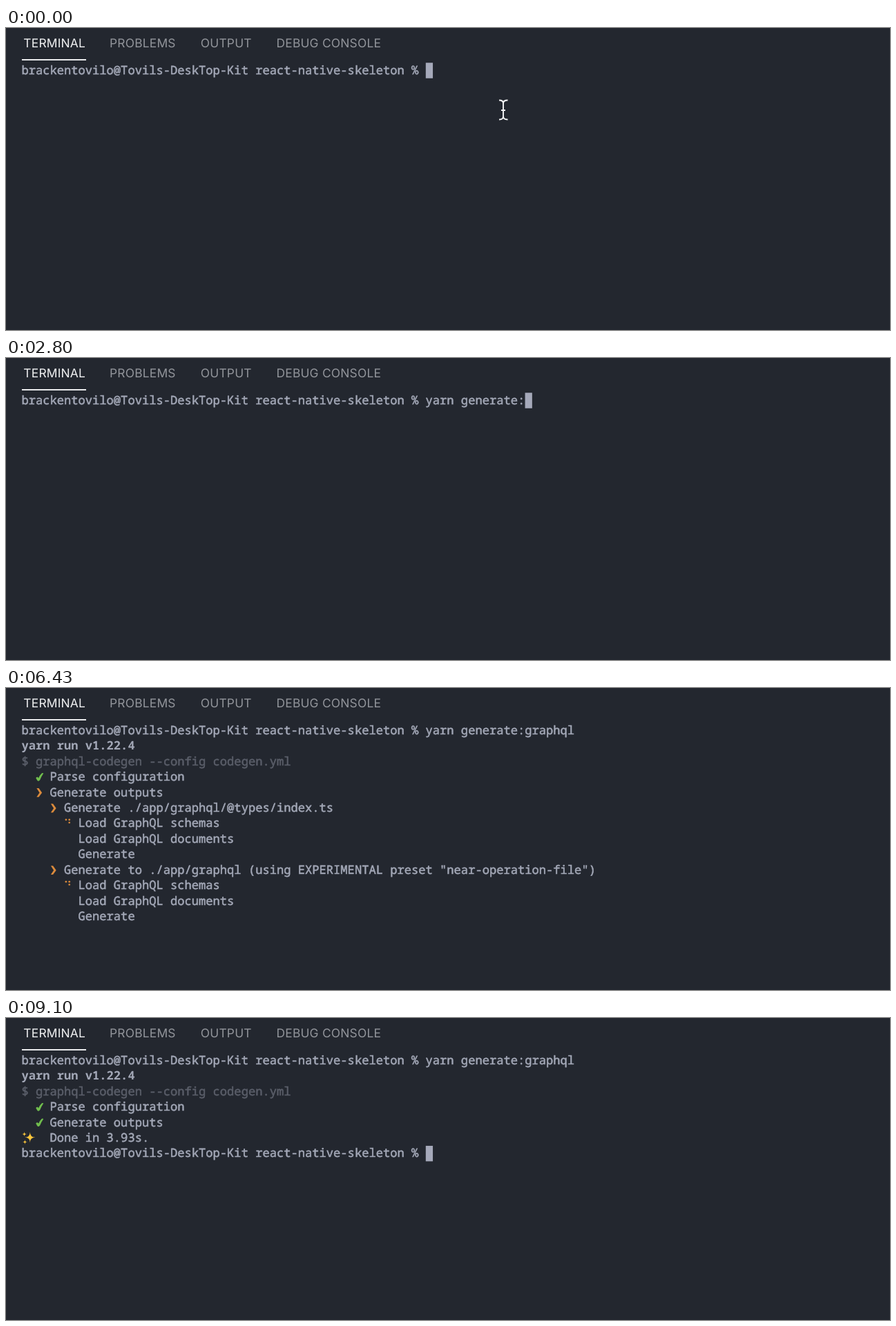
An HTML page with a canvas that plays this animation: 1280 by 437 pixels, repeating every 9810 ms.

```html
<!DOCTYPE html>
<html lang="en">
<head>
<meta charset="utf-8">
<title>Terminal</title>
<style>
  html, body { margin: 0; width: 100%; height: 100%; overflow: hidden; background: #23272f; }
  body { position: relative; text-rendering: geometricPrecision; }
  canvas { position: absolute; left: 0; top: 0; }
  .tab {
    position: absolute; top: 11.5px; white-space: pre; color: #92959b;
    font: 17.4px/22px Inter, "Liberation Sans", sans-serif; letter-spacing: .2px;
  }
  .tab.on { color: #f0f1f2; }
  .underline { position: absolute; left: 23px; top: 45px; width: 93px; height: 2px; background: #e9eaec; }
  .row {
    position: absolute; white-space: pre; color: #a3a8b7;
    font: 500 17.117px/22.44px "Noto Sans Mono", "DejaVu Sans Mono", monospace;
    font-variant-ligatures: none; -webkit-text-stroke: .55px;
  }
  .row.bold { font-weight: 700; -webkit-text-stroke: 0; }
  .row.dim { color: #5a5e69; }
</style>
</head>
<body>
<div class="tab on" style="left:25.3px">TERMINAL</div>
<div class="tab" style="left:150px">PROBLEMS</div>
<div class="tab" style="left:281.8px">OUTPUT</div>
<div class="tab" style="left:391.5px">DEBUG CONSOLE</div>
<div class="underline"></div>
<div id="rows"></div>
<canvas id="shapes" width="1280" height="437"></canvas>
<script>
const LOOP = 9810;
const LEFT = 22.4, TOP = 50.3, CELL = 10.27, LINE = 22.44, TEXT_SHIFT = 0.5;
const GREEN = '#72c04e', ORANGE = '#da8a3c', CURSOR = '#a5a9ba';

const PROMPT = 'brackentovilo@Tovils-DeskTop-Kit react-native-skeleton % ';
const COMMAND = 'yarn generate:graphql';
const KEY_TIMES = [70, 230, 900, 1070, 1200, 1400, 1530, 1630, 1730, 1900, 2030,
  2170, 2230, 2800, 3100, 3200, 3400, 3500, 3670, 3770, 3900];
const AT = { enter: 4230, yarn: 4430, script: 4500, tasks: 6400, documents: 6830,
  generate: 6950, done: 7100, summary: 8370, prompt: 8400 };

// Braille dots of each spinner pose, as column + 2 * row
const SPINNER = [[0, 1, 2], [0, 1, 3], [0, 1, 3, 5], [1, 3, 5], [1, 3, 4, 5],
  [3, 4, 5], [2, 4, 5], [0, 2, 4, 5], [0, 2, 4], [0, 1, 2, 4]];

const ctx = document.getElementById('shapes').getContext('2d');
const rowBox = document.getElementById('rows');
const rowEls = Array.from({ length: 13 }, (_, i) => {
  const el = rowBox.appendChild(document.createElement('div'));
  el.style.left = LEFT + 'px';
  el.style.top = TOP + TEXT_SHIFT + i * LINE + 'px';
  return el;
});

const line = (text, style = '') => ({ text, style });
const task = (indent, icon, text) =>
  ({ text: ' '.repeat(indent + 2) + text, style: '', icon, col: indent });

function subtasks(t) {
  const stage = t < AT.documents ? 0 : t < AT.generate ? 1 : 2;
  return ['Load GraphQL schemas', 'Load GraphQL documents', 'Generate'].map((name, i) =>
    task(6, i < stage ? 'check' : i === stage ? 'spinner' : null, name));
}

function screen(t) {
  const typed = KEY_TIMES.filter(k => t >= k).length;
  const rows = [line(PROMPT + COMMAND.slice(0, typed))];
  if (t < AT.enter) return { rows, cursor: [PROMPT.length + typed, 0] };

  if (t >= AT.yarn) rows.push(line('yarn run v1.22.4', 'bold'));
  if (t >= AT.script) rows.push(line('$ graphql-codegen --config codegen.yml', 'dim'));
  if (t >= AT.tasks) {
    const busy = t < AT.done;
    rows.push(task(2, 'check', 'Parse configuration'),
      task(2, busy ? 'arrow' : 'check', 'Generate outputs'));
    if (busy) {
      rows.push(task(4, 'arrow', 'Generate ./app/graphql/@types/index.ts'), ...subtasks(t),
        task(4, 'arrow', 'Generate to ./app/graphql (using EXPERIMENTAL preset "near-operation-file")'),
        ...subtasks(t));
      return { rows, cursor: null };
    }
  }
  if (t >= AT.summary) rows.push({ text: '    Done in 3.93s.', style: '', icon: 'sparkles', col: 0 });
  if (t >= AT.prompt) {
    rows.push(line(PROMPT));
    return { rows, cursor: [PROMPT.length, rows.length - 1] };
  }
  return { rows, cursor: [0, rows.length] };
}

function star(x, y, r) {
  ctx.beginPath();
  ctx.moveTo(x, y - r);
  for (const [dx, dy] of [[1, 0], [0, 1], [-1, 0], [0, -1]]) {
    ctx.quadraticCurveTo(x, y, x + dx * r, y + dy * r);
  }
  ctx.fill();
}

// Icons are drawn relative to the top left corner of their cell
const icons = {
  check() {
    ctx.fillStyle = ctx.strokeStyle = GREEN;
    ctx.lineWidth = 0.9;
    ctx.beginPath();
    ctx.moveTo(0.8, 12.4);
    ctx.quadraticCurveTo(2.4, 10.8, 3.2, 12);
    ctx.lineTo(4.2, 13.4);
    ctx.quadraticCurveTo(6.2, 8.8, 9, 6);
    ctx.lineTo(10.8, 6);
    ctx.quadraticCurveTo(7.6, 10.8, 5.6, 15.8);
    ctx.quadraticCurveTo(3.8, 17.2, 2.8, 16.2);
    ctx.closePath();
    ctx.fill();
    ctx.stroke();
  },
  arrow() {
    ctx.fillStyle = ORANGE;
    ctx.beginPath();
    [[1.4, 5], [4.6, 5], [9.2, 11.4], [4.6, 17.8], [1.4, 17.8], [5.6, 11.4]]
      .forEach(([x, y]) => ctx.lineTo(x, y));
    ctx.fill();
  },
  spinner(t) {
    const pose = t < 6430 ? 0 : 1 + Math.floor((t - 6430) / 40);
    ctx.fillStyle = ORANGE;
    for (const dot of SPINNER[pose % SPINNER.length]) {
      ctx.beginPath();
      ctx.arc(2.9 + (dot % 2) * 4.8, 5.6 + (dot >> 1) * 4.2, 1.35, 0, 7);
      ctx.fill();
    }
  },
  sparkles() {
    ctx.fillStyle = '#fbc63c';
    star(12.4, 10.2, 7.6);
    star(4.2, 5.6, 3.6);
    star(5, 17, 3.4);
  }
};

function drawPointer() {
  ctx.beginPath();
  for (const s of [-1, 1]) {
    ctx.moveTo(714, 118.5 + s * 14);
    ctx.quadraticCurveTo(720, 118.5 + s * 14, 720, 118.5 + s * 9.5);
    ctx.quadraticCurveTo(720, 118.5 + s * 14, 726.5, 118.5 + s * 14);
  }
  ctx.moveTo(720, 109);
  ctx.lineTo(720, 128);
  ctx.moveTo(717, 119);
  ctx.lineTo(723, 119);
  ctx.strokeStyle = '#f4f4f5';
  ctx.lineWidth = 1.9;
  ctx.stroke();
}

function draw(t) {
  const { rows, cursor } = screen(t);
  rowEls.forEach((el, i) => {
    const { text, style } = rows[i] || line('');
    if (el.textContent !== text) el.textContent = text;
    el.className = 'row ' + style;
  });

  ctx.clearRect(0, 0, 1280, 437);
  rows.forEach((row, i) => {
    if (!row.icon) return;
    ctx.save();
    ctx.translate(LEFT + row.col * CELL, TOP + i * LINE);
    icons[row.icon](t);
    ctx.restore();
  });
  if (cursor) {
    ctx.fillStyle = CURSOR;
    ctx.fillRect(LEFT + cursor[0] * CELL, TOP + cursor[1] * LINE, CELL, LINE);
  }
  if (t < 30) drawPointer();
}

const start = performance.now();
function tick() {
  draw((performance.now() - start) % LOOP);
  requestAnimationFrame(tick);
}
tick();
</script>
</body>
</html>
```
